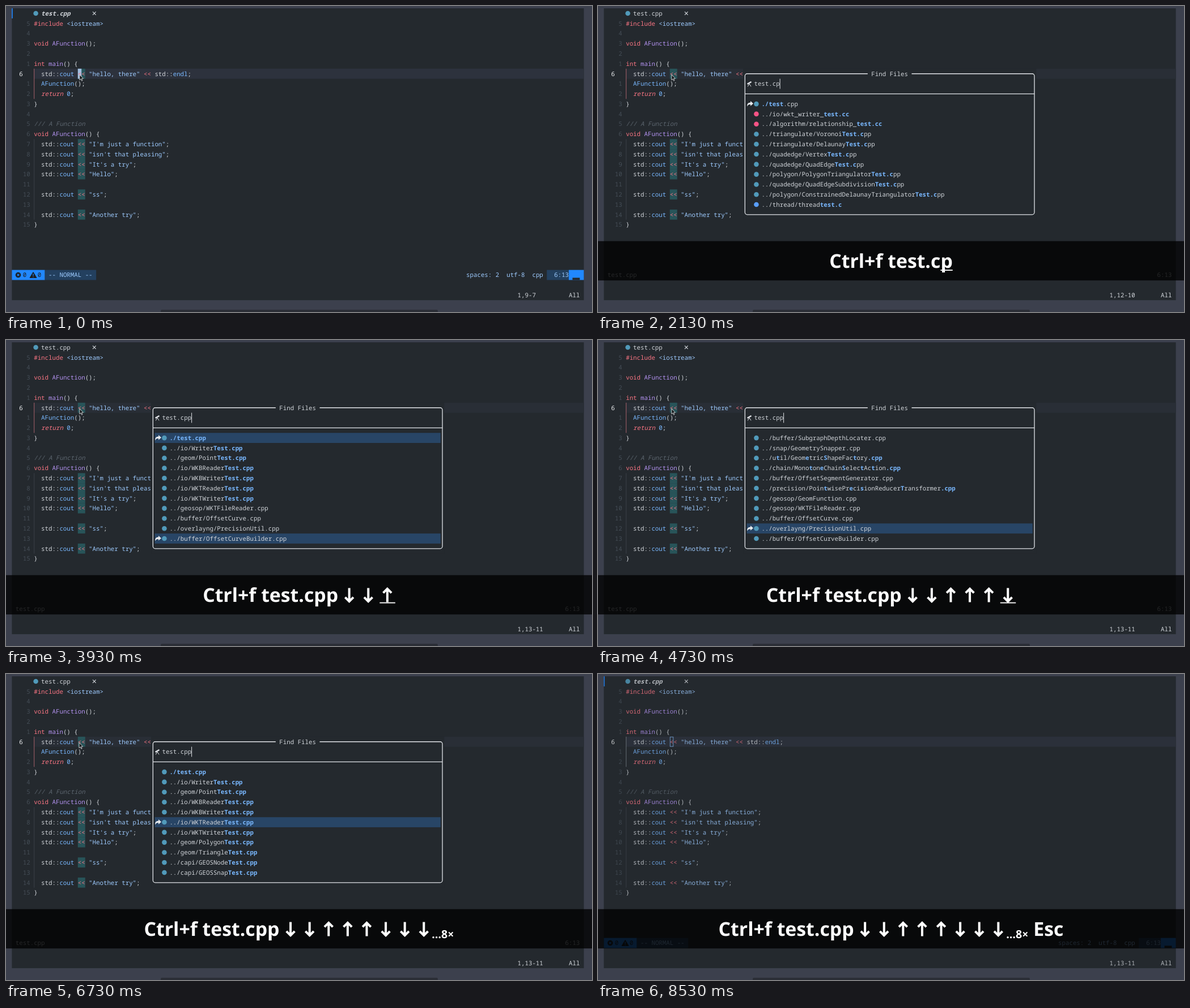
These frames come from a looping animation (1034x541 px, 8740 ms). An HTML page:

```html
<!DOCTYPE html>
<html lang="en">
<head>
<meta charset="utf-8">
<title>Find Files</title>
<style>
html, body { margin: 0; width: 100%; height: 100%; overflow: hidden; background: #3c404d; }
svg { display: block; width: 100%; height: 100%; }
text { font: 10.775px "Noto Sans Mono", "DejaVu Sans Mono", monospace; fill: #d1d5da; white-space: pre; text-rendering: geometricPrecision; }
.comment { fill: #5c656e; font-style: italic; }
.str { fill: #9ecbff; }
.kw { fill: #f97583; }
.ret { fill: #f97583; font-style: italic; }
.var { fill: #79b8ff; }
.fn { fill: #b392f0; }
.num { fill: #444d56; text-anchor: end; }
.cur { fill: #f0f2f4; font-weight: 500; }
.hit { fill: #79b8ff; font-weight: 700; }
.tab { font-weight: 700; font-style: italic; }
#keys text { font: 700 33.8px "Noto Sans", "Open Sans", sans-serif; fill: #fff; }
#keys text.sub { font-size: 19.6px; }
#keys path { fill: none; stroke: #fff; stroke-width: 4; }
</style>
</head>
<body>
<svg viewBox="0 0 1034 541" preserveAspectRatio="none">
  <rect width="1034" height="541" fill="#3c404d"/>
  <rect x="273" y="537" width="489" height="6" rx="2" fill="#2b2e36"/>
  <rect x="10.4" y="4.1" width="1009.2" height="516" fill="#24292e"/>
  <g id="editor"></g>
  <g id="status"></g>
  <g id="popup"></g>
  <rect id="dim" x="10" y="4" width="1010" height="516" fill="#24292e"/>
  <path id="mouse" d="M0 0V9.4L2.2 7.4L3.7 10.8L5.1 10.2L3.7 6.9L6.6 6.7Z" fill="#15181b" stroke="#eef0f2" stroke-width=".8"/>
  <g id="keys"></g>
</svg>
<script>
const LOOP = 8740, CW = 6.465, RH = 17.79, BG = '#24292e';
const $ = id => document.getElementById(id);
const col = c => 10.4 + CW * c;
const top_ = r => 4.1 + RH * r;
const mid = r => 13 + RH * r;
const esc = s => s.replace(/&/g, '&amp;').replace(/</g, '&lt;').replace(/>/g, '&gt;');
const rect = (x, y, w, h, fill, extra = '') =>
  `<rect x="${x}" y="${y}" width="${w}" height="${h}" fill="${fill}" ${extra}/>`;
const cells = (c, r, n, fill) => rect(col(c), top_(r), n * CW, RH, fill);
const text = (c, r, body, cls = '', attr = '') =>
  `<text x="${col(c)}" y="${mid(r) + 3.8}" class="${cls}" ${attr}>${body}</text>`;
const span = (s, cls) => `<tspan class="${cls}">${esc(s)}</tspan>`;
const line = (x1, y1, x2, y2, color, w = 1.3) =>
  `<path d="M${x1} ${y1}L${x2} ${y2}" stroke="${color}" stroke-width="${w}" fill="none"/>`;
const dot = (x, y, color) => `<circle cx="${x}" cy="${y}" r="4.3" fill="${color}"/>`;

const code = `#include <iostream>

void AFunction();

int main() {
  std::cout << "hello, there" << std::endl;
  AFunction();
  return 0;
}

/// A Function
void AFunction() {
  std::cout << "I'm just a function";
  std::cout << "isn't that pleasing";
  std::cout << "It's a try";
  std::cout << "Hello";

  std::cout << "ss";

  std::cout << "Another try";
}`.split('\n');

const TOKEN = /(\/\/\/.*)|("[^"]*"|<iostream>)|(#include|\bvoid\b|\bint\b|<<)|(\breturn\b)|(\bcout\b|\bendl\b|\b0\b|^ +AFunction)|(AFunction|\bmain\b)/g;
const CLASSES = ['comment', 'str', 'kw', 'ret', 'var', 'fn'];

function paint(src) {
  let out = '', at = 0;
  for (const m of src.matchAll(TOKEN)) {
    out += esc(src.slice(at, m.index)) + span(m[0], CLASSES[m.slice(1).findIndex(Boolean)]);
    at = m.index + m[0].length;
  }
  return out + esc(src.slice(at));
}

const topList = ['./test', '../io/WriterTest', '../geom/PointTest', '../io/WKBReaderTest', '../io/WKBWriterTest',
  '../io/WKTReaderTest', '../io/WKTWriterTest', '../geom/PolygonTest', '../geom/TriangleTest',
  '../capi/GEOSNodeTest', '../capi/GEOSSnapTest'].map(s => s + '.cpp');
const typedList = ['./test.cpp', '../io/wkt_writer_test.cc', '../algorithm/relationship_test.cc',
  '../triangulate/VoronoiTest.cpp', '../triangulate/DelaunayTest.cpp', '../quadedge/VertexTest.cpp',
  '../quadedge/QuadEdgeTest.cpp', '../polygon/PolygonTriangulatorTest.cpp',
  '../quadedge/QuadEdgeSubdivisionTest.cpp', '../polygon/ConstrainedDelaunayTriangulatorTest.cpp',
  '../thread/threadtest.c'];
const endList = ['../buffer/SubgraphDepthLocater.cpp', '../snap/GeometrySnapper.cpp',
  '../u*t*il/Geom*e*tric*S*hapeFac*t*ory*.cpp', '../chain/Mono*t*on*e*Chain*S*elec*t*Ac*t*ion*.cpp',
  '../buffer/OffsetSegmentGenerator.cpp', '../precision/Poin*t*wisePr*e*ci*s*ionReducer*T*ransformer*.cpp',
  '../geosop/GeomFunction.cpp', '../geosop/WKTFileReader.cpp', '../buffer/OffsetCurve.cpp',
  '../overlayng/PrecisionUtil.cpp', '../buffer/OffsetCurveBuilder.cpp'];

// Odd pieces of each row are the highlighted matches.
const cut = (list, re) => list.map(s => s.split(re));
const lists = {
  none: [],
  all: endList.map(s => [s.replace(/\*/g, '')]),
  test: cut(typedList, /(test)/i),
  testc: cut(typedList, /(^\.\/test|test\.cc?)/i),
  top: cut(topList, /(^\.\/test\.cpp|test\.cpp)/i),
  end: cut(endList, /\*/)
};
lists.mixed = [...lists.top.slice(0, 7), ...lists.end.slice(7)];

// Each step overrides part of the state from its time on; "ul" underlines the latest key.
const steps = [
  [0, { open: 0, query: '', list: 'none', sel: [], mark: [], keys: '', arrows: '', times: 0, esc: 0, ul: 0, ruler: '1,9-7', match: 1, focus: 1 }],
  [130, { keys: 'Ctrl+f', ul: 1 }],
  [270, { open: 1, ruler: '1,5-3' }],
  [400, { list: 'all', sel: [1], ul: 0 }],
  [1000, { query: 't', keys: 'Ctrl+f t', ul: 1, ruler: '1,6-4' }],
  [1200, { query: 'te', keys: 'Ctrl+f te', ruler: '1,7-5' }],
  [1330, { query: 'tes', keys: 'Ctrl+f tes', ruler: '1,8-6' }],
  [1470, { query: 'test', keys: 'Ctrl+f test', ruler: '1,9-7', list: 'test' }],
  [1600, { ul: 0 }],
  [2130, { query: 'test.cp', keys: 'Ctrl+f test.cp', ul: 1, ruler: '1,12-10', list: 'testc', sel: [], mark: [1] }],
  [2200, { query: 'test.cpp', keys: 'Ctrl+f test.cpp', ruler: '1,13-11' }],
  [2330, { list: 'top', sel: [1] }],
  [2470, { ul: 0 }],
  [2870, { arrows: 'd', ul: 1, sel: [2] }],
  [3200, { arrows: 'dd', sel: [3] }],
  [3330, { ul: 0 }],
  [3730, { sel: [1] }],
  [3930, { arrows: 'ddu', ul: 1, list: 'mixed', sel: [1, 11] }],
  [4070, { ul: 0, list: 'end', sel: [11] }],
  [4200, { arrows: 'dduu', ul: 1, sel: [10] }],
  [4330, { ul: 0 }],
  [4470, { arrows: 'dduuu', ul: 1, sel: [9] }],
  [4600, { ul: 0 }],
  [4730, { arrows: 'dduuud', ul: 1, sel: [10] }],
  [4870, { ul: 0 }],
  [5000, { arrows: 'dduuudd', ul: 1, sel: [11] }],
  [5200, { arrows: 'dduuuddd', list: 'top', sel: [1] }],
  [5330, { ul: 0 }],
  [5400, { times: 4, ul: 1, sel: [2] }],
  [5600, { times: 5, sel: [3] }],
  [5730, { times: 6, sel: [4] }],
  [5930, { times: 7, sel: [5] }],
  [6070, { ul: 0 }],
  [6200, { times: 8, ul: 1, sel: [6] }],
  [6330, { ul: 0 }],
  [7200, { open: 0, esc: 1, ul: 1, match: 0 }],
  [7330, { ul: 0 }],
  [7470, { match: 1 }],
  [8130, { match: 0, focus: 0 }]
];
let acc = {};
const states = steps.map(([at, change]) => ({ ...(acc = { ...acc, ...change, at }) }));

function drawEditor(s) {
  const active = !s.open;
  let out = rect(col(6), top_(6), 1019.6 - col(6), RH, active ? '#2d323d' : '#292e36');
  if (active) out += rect(10.2, top_(0), 1.6, RH, '#2188ff');
  out += dot(52.6, mid(0), '#519aba') + text(8, 0, 'test.cpp', active ? 'tab' : '');
  out += line(153, 10.2, 158.6, 15.8, '#d1d5da', 1.2) + line(158.6, 10.2, 153, 15.8, '#d1d5da', 1.2);
  out += line(49.7, top_(13), 49.7, top_(21), '#3a4148', 1);
  out += line(49.7, top_(6), 49.7, top_(9), s.focus ? '#a5626b' : '#737a82', 1);
  code.forEach((src, i) => {
    const r = i + 1, at = src.indexOf('<<');
    if (s.match && at > 0) out += cells(6 + at, r, 2, '#285459');
    if (i === 5 && active && s.focus) out += cells(18, r, 1, '#a3bfe0');
    out += i === 5 ? text(2, r, '6', 'cur') : text(5, r, Math.abs(i - 5), 'num');
    out += text(6, r, paint(src));
  });
  if (!s.focus) out += rect(col(18) + .5, top_(6) + .5, CW - 1, RH - 1, 'none', 'stroke="#79a5d8"');
  $('editor').innerHTML = out;
}

function drawStatus(s) {
  const r = 26, y = mid(r);
  let out = text(138, 28, s.ruler) + text(152, 28, 'All');
  if (s.open) out += text(1, r, 'test.cpp', '', 'opacity=".75"') + text(151, r, '6:13', '', 'opacity=".75"');
  else {
    const ink = 'style="fill:#1b1f23"';
    out += cells(0, r, 9, '#2188ff') + cells(9, r, 14, '#23405f');
    out += `<circle cx="21.5" cy="${y}" r="4.8" fill="#1b1f23"/>`;
    out += line(19.7, y - 1.8, 23.3, y + 1.8, '#2188ff') + line(23.3, y - 1.8, 19.7, y + 1.8, '#2188ff');
    out += `<path d="M48 ${y - 5}L54 ${y + 5}H42Z" fill="#1b1f23" stroke="#1b1f23" stroke-linejoin="round"/>`;
    out += line(48, y - 2, 48, y + 1.5, '#2188ff') + line(48, y + 2.6, 48, y + 4, '#2188ff');
    out += text(3, r, '0', '', ink) + text(7, r, '0', '', ink);
    out += text(10, r, '-- NORMAL --', 'str') + text(124, r, 'spaces: 2', 'str');
    out += text(135, r, 'utf-8', 'str') + text(142, r, 'cpp', 'str');
    out += cells(146, r, 6, '#23405f') + text(148, r, '6:13', 'str');
    out += rect(col(152), top_(r), 1019.6 - col(152), RH, '#2188ff');
    out += rect(col(153), top_(r) + 13.8, 2 * CW, 4, BG);
  }
  $('status').innerHTML = out;
}

const iconColor = name => /\.cc$/.test(name) ? '#f55385' : /\.c$/.test(name) ? '#599eff' : '#519aba';

function drawRow(parts, i, s) {
  const r = 9 + i, y = mid(r), on = s.sel.includes(i + 1);
  let out = on ? cells(39, r, 78, '#284566') : '';
  if (on || s.mark.includes(i + 1) && !s.sel.length)
    out += `<path transform="translate(263 ${y})" d="M0 4.6C0 -1 2.5 -2.4 6 -2.4V-5L11 -.6L6 3.6V1C3 1 1.2 2 0 4.6Z" fill="#e6e9ec"/>`;
  return out + dot(279.4, y, iconColor(parts.join(''))) +
    text(43, r, parts.map((p, k) => k % 2 ? span(p, 'hit') : esc(p)).join(''));
}

function drawPopup(s) {
  if (!s.open) return $('popup').innerHTML = '';
  const edge = '#e1e4e8', x = col(38.5), w = CW * 79, y = mid(7);
  let out = rect(col(38), top_(6), CW * 80, RH * 15, BG);
  out += rect(x, mid(6), w, RH * 14, 'none', `rx="4" stroke="${edge}" stroke-width="1.3"`);
  out += rect(col(72), mid(6) - 3, CW * 12, 6, BG) + text(73, 6, 'Find Files');
  out += line(x, mid(8), x + w, mid(8), edge);
  out += line(263.5, y + .5, 270.5, y - 3.5, edge, 2.4) + line(267, y, 264.2, y + 4.8, edge, 1) + line(267, y, 270, y + 4.8, edge, 1);
  out += text(41, 7, s.query);
  const caret = col(41 + s.query.length) + .4;
  out += line(caret, top_(7), caret, top_(8), edge, 1);
  $('popup').innerHTML = out + lists[s.list].map((p, i) => drawRow(p, i, s)).join('');
}

const pen = document.createElement('canvas').getContext('2d');
function width(str, size = 33.8) {
  pen.font = `700 ${size}px "Noto Sans", "Open Sans", sans-serif`;
  return pen.measureText(str).width;
}

function drawKeys(s) {
  if (!s.keys) return $('keys').innerHTML = '';
  const base = 463, pitch = 33.6, sub = s.times ? `…${s.times}×` : '';
  const keyW = width(s.keys), subW = sub ? width(sub, 19.6) : 0;
  const total = keyW + pitch * s.arrows.length + subW + (s.esc ? width(' Esc') : 0);
  let x = 517 - total / 2, last = width(s.keys.slice(-1)), under = 467;
  let out = rect(0, 415.7, 1034, 69.5, '#000', 'opacity=".78"');
  const word = (str, cls = '', dy = 0) => `<text x="${x}" y="${base + dy}" class="${cls}">${str}</text>`;
  out += word(s.keys);
  x += keyW;
  for (const a of s.arrows) {
    x += pitch;
    out += `<path transform="translate(${x - 14} 451) scale(1 ${a === 'd' ? 1 : -1})" d="M0 -12.5V11M-7.3 3.8L0 11.2L7.3 3.8"/>`;
    last = 27.5;
    under = 464.5;
  }
  if (sub) {
    out += word(sub, 'sub', 4);
    x += last = subW;
    under = 469;
  }
  if (s.esc) {
    x += width(' ');
    out += word('Esc');
    x += last = width('Esc');
    under = 467;
  }
  if (s.ul) out += rect(x - last, under - .8, last, 1.8, '#fff');
  $('keys').innerHTML = out;
}

const lerp = (a, b, k) => a + (b - a) * Math.min(1, Math.max(0, k));

function moveMouse(t) {
  const go = (t - 7470) / 730, leave = (t - 8330) / 200;
  const x = lerp(t < 6730 ? 129.8 : 129, 74, go) + lerp(0, -12, leave);
  const y = lerp(121.5, -8, go) + lerp(0, -6, leave);
  $('mouse').setAttribute('transform', `translate(${x} ${y})`);
}

let shown = null;
function render(t) {
  const s = states.findLast(k => k.at <= t);
  if (s !== shown) {
    shown = s;
    drawEditor(s);
    drawStatus(s);
    drawPopup(s);
    drawKeys(s);
    $('dim').setAttribute('opacity', s.focus ? 0 : .18);
  }
  moveMouse(t);
}

function tick() {
  render(performance.now() % LOOP);
  requestAnimationFrame(tick);
}
tick();
</script>
</body>
</html>
```
